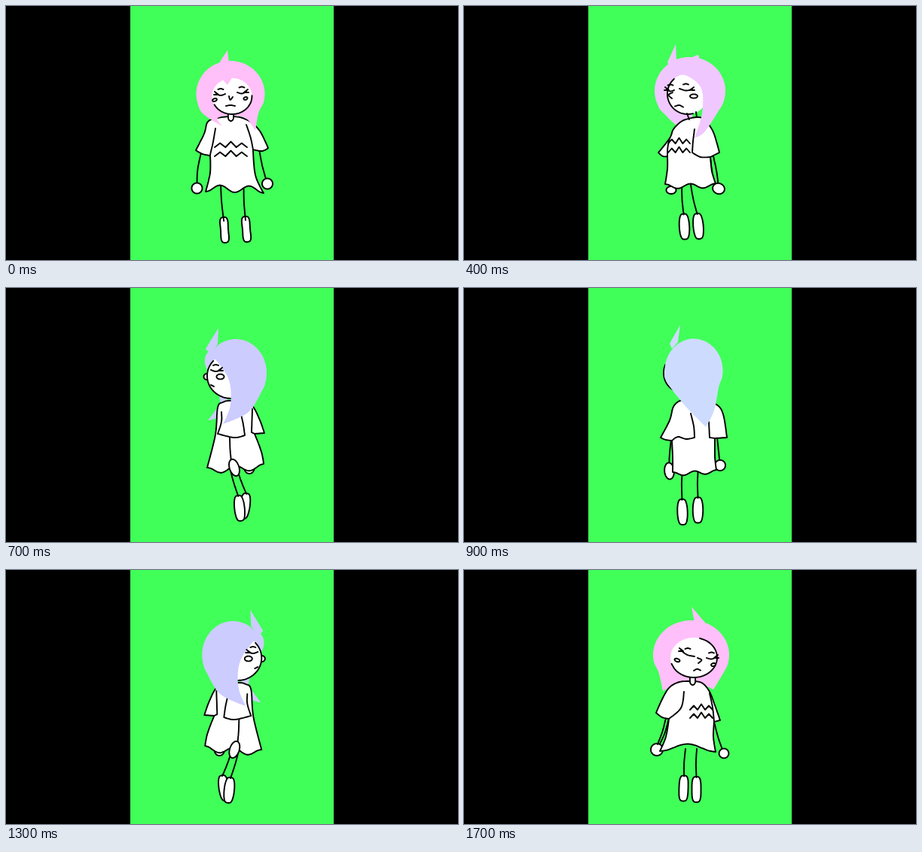
Animation of 600 by 338 pixels, one loop 1800 ms. Source, as an HTML page:

```html
<!DOCTYPE html>
<html lang="en">
<head>
<meta charset="utf-8">
<title>Turnaround</title>
<style>
html, body { margin: 0; width: 100%; height: 100%; overflow: hidden; background: #000; }
svg { display: block; width: 100vw; height: 100vh; }
path { stroke: #000; stroke-width: 1.9; stroke-linecap: round; stroke-linejoin: round; fill: none; }
.white { fill: #fff; }
.plain { fill: #fff; stroke: none; }
.hair { stroke: none; }
</style>
</head>
<body>
<svg viewBox="0 0 600 338">
  <rect width="600" height="338" fill="#000"/>
  <rect x="165" width="270" height="338" fill="#40ff59"/>
  <g id="girl"></g>
</svg>
<script>
const mix = (a, b, t) => a + (b - a) * t;
const rad = deg => deg * Math.PI / 180;
const range = (n, fn) => Array.from({ length: n }, (_, i) => fn(i));

// "x,y x,y!" to points; "!" marks a sharp corner.
const points = text => text.split(" ").map(s => {
  const [x, y] = s.replace("!", "").split(",").map(Number);
  return { x, y, hard: s.endsWith("!") };
});

// Smooth line through the points, sharp at hard ones.
function curve(p, closed) {
  const n = p.length, out = [];
  const at = i => closed ? p[(i + n) % n] : p[Math.max(0, Math.min(n - 1, i))];
  for (let i = 0; i < (closed ? n : n - 1); i++) {
    const a = at(i), b = at(i + 1), prev = at(i - 1), next = at(i + 2);
    const axis = (k, t) => {
      const c = a.hard ? a[k] : a[k] + (b[k] - prev[k]) / 6;
      const d = b.hard ? b[k] : b[k] - (next[k] - a[k]) / 6;
      const s = 1 - t;
      return s * s * s * a[k] + 3 * s * s * t * c + 3 * s * t * t * d + t * t * t * b[k];
    };
    for (let j = 0; j < 8; j++) out.push({ x: axis("x", j / 8), y: axis("y", j / 8) });
  }
  if (!closed) out.push(at(n - 1));
  return out;
}

const shape = (name, kind, pts) => ({ name, kind, closed: true, pts: curve(pts, true) });
const line = (name, pts) => ({ name, kind: "line", closed: false, pts: curve(pts, false) });
const arc = (cx, cy, rx, ry, from, to, n = 12) => range(n + 1, i => {
  const a = rad(mix(from, to, i / n));
  return { x: cx + rx * Math.cos(a), y: cy + ry * Math.sin(a) };
});

// Line bent sideways in its middle.
function bow(name, x0, y0, x1, y1, sag = 0) {
  const dx = x1 - x0, dy = y1 - y0, len = Math.hypot(dx, dy);
  const mid = { x: (x0 + x1 - 2 * dy / len * sag) / 2, y: (y0 + y1 + 2 * dx / len * sag) / 2 };
  return line(name, [{ x: x0, y: y0 }, mid, { x: x1, y: y1 }]);
}

// Oval; a squarer power and a pinched waist turn it into a foot.
function oval(name, cx, cy, rx, ry = rx, tilt = 0, power = 1, pinch = 0) {
  const a = rad(tilt);
  return shape(name, "white", range(24, i => {
    const u = i * Math.PI / 12, c = Math.cos(u);
    const p = rx * Math.sign(c) * Math.abs(c) ** power * (1 - pinch * c ** 4), q = ry * Math.sin(u);
    return { x: cx + p * Math.cos(a) - q * Math.sin(a), y: cy + p * Math.sin(a) + q * Math.cos(a) };
  }));
}

const FOOT = 17;
function leg(side, hip, x, y, tilt = 0, pinch = 0, inset = 1) {
  const top = FOOT - inset;
  return [
    oval("foot" + side, x, y, 6.7, FOOT, tilt, 0.6, pinch),
    bow("leg" + side, hip, 238, x + top * Math.sin(rad(tilt)), y - top * Math.cos(rad(tilt)), 0.8)
  ];
}

const arm = (side, x, y, hx, hy, sag, rx = 7, ry = rx, tilt = 0) =>
  [bow("arm" + side, x, y, hx, hy, sag), oval("hand" + side, hx, hy, rx, ry, tilt)];

// Both sides run downward from the neck; the hem waves between their ends.
function dress(left, right, wave, bumps = 2) {
  const l = points(left), r = points(right).reverse(), a = l[l.length - 1], b = r[0];
  const hem = range(7 * bumps, i => {
    const t = (i + 1) / (7 * bumps + 1);
    return { x: mix(a.x, b.x, t), y: mix(a.y, b.y, t) - wave * (1 - Math.cos(2 * Math.PI * bumps * t)) / 2 };
  });
  return shape("dress", "white", [...l, ...hem, ...r]);
}

const zigzags = (x, y, w, gap) => [0, 1].map(row => ({
  name: "zigzag" + row, kind: "line", closed: false,
  pts: range(7, i => ({ x: x + w * i / 6, y: y + row * gap - (i % 2) * 5.5 - (i === 3 ? 2 : 0) }))
}));

const hair = (name, cx, cy, rx, ry, from, to, rest) =>
  shape(name, "hair", [...arc(cx, cy, rx, ry, from, to), ...points(rest)]);
const tuft = text => shape("tuft", "hair", points(text));
const neck = (x, y) =>
  shape("neck", "white", points(`${x - 3.5},${y}! ${x - 3.3},${y + 9} ${x},${y + 12} ${x + 3.3},${y + 9} ${x + 3.5},${y}!`));
const face = (cx, cy, rx, ry, from, to) => [
  shape("face", "plain", arc(cx, cy, rx, ry, 0, 345, 23)),
  line("jaw", arc(cx, cy, rx, ry, from, to))
];

// Lid with two lashes at the outer end and a brow above.
function eye(side, x0, y0, x1, y1) {
  const out = side === "L" ? -1 : 1, [x, y] = out < 0 ? [x0, y0] : [x1, y1];
  const mx = (x0 + x1) / 2, my = (y0 + y1) / 2 - 6;
  return [
    bow("lid" + side, x0, y0, x1, y1, 2),
    bow("lash" + side, x - out * 3, y + 1, x + out * 2, y - 3, 0),
    bow("tip" + side, x - out, y + 1, x + out * 3, y + 1, 0),
    bow("brow" + side, mx - 3.5, my, mx + 3.5, my, -1)
  ];
}

function flip({ rgb, parts }) {
  const swap = { L: "R", R: "L" };
  return {
    rgb,
    parts: parts.map(p => ({
      ...p,
      name: p.name.replace(/[LR]$/, s => swap[s]),
      pts: p.pts.map(({ x, y }) => ({ x: 606.3 - x, y }))
    }))
  };
}

const pose = (rgb, ...items) => ({ rgb, parts: items.flat(2) });

// Shared by the views from straight ahead and straight behind.
const standing = (hem, wave, tip) => [
  leg("L", 285, 290, 298, -4, 0.25, 5), leg("R", 315.5, 319, 297, -5, 0.25, 5),
  arm("L", 259, 195, 253.5, 242.5, 2), arm("R", 336, 191, 347, 236.5, 1),
  dress(`296,147 281,149 268,154 263,170 252,192! 261,197 271,199! 271,222 ${hem - 240 + 258},${hem}!`,
    `302,147 314,149 327,156 338,168 348,${tip}! 340,193 328,191! 331,225 342,${hem + 2}!`, wave)
];

const front = pose([255, 191, 248],
  standing(247, 9, 189),
  bow("sleeveL", 278, 163, 271, 198, -0.5), bow("sleeveR", 319, 158, 328, 191, -1),
  zigzags(277, 188, 43, 12),
  tuft("294,59! 284,74! 289,80! 296,76!"),
  hair("back", 298, 117, 45.5, 44, 142, 395, "331,166! 319,150 300,146 281,149 287,160!"),
  neck(298.5, 141),
  face(300, 120, 26.5, 24, -2, 152),
  shape("fringe", "hair", points("284,94! 294,105! 301,94!")),
  eye("L", 279, 117, 291, 117), eye("R", 307, 115, 319, 114),
  oval("cheekL", 277, 125, 3, 1.8, -20), oval("cheekR", 318, 123, 2.6, 1.8, -20),
  bow("nose", 296, 120, 301, 121, 4.5), bow("mouth", 292, 133, 304, 133, -1));

const slant = pose([255, 191, 250],
  tuft("302,49! 306,70! 314,78! 320,70!"),
  hair("back", 301.5, 113, 50.5, 46, 148, 395, "331,159! 300,148 264,161!"),
  leg("L", 294, 291.5, 290.5, 2, 0.1), leg("R", 309, 308.5, 292, 0, 0.1),
  arm("L", 272, 197, 256, 239, -2, 8), arm("R", 332, 202, 345, 244, 1, 6.4),
  bow("side", 268, 197, 257, 232, -1),
  dress("300,148 286,149 273,156 264,170 255,190! 263,196 272,198! 268,222 260,241!",
    "307,148 317,151 326,162 333,180 340,200! 332,202! 331,222 334,242!", 10, 1),
  bow("sleeveL", 292, 162, 272, 198, -7), bow("sleeveR", 326, 164, 332, 202, -1),
  zigzags(300, 186, 30, 11),
  neck(303.5, 141),
  face(305, 116.5, 31, 26.5, -75, 162),
  eye("L", 288, 107, 306, 115), eye("R", 322, 117, 335, 116),
  oval("cheekL", 283, 120, 3.6, 2, 20), oval("cheekR", 331, 126, 3, 2, -15),
  bow("nose", 310, 117, 311, 124, -5), bow("mouth", 305, 134, 314, 133.5, -2));

const side = pose([240, 199, 255],
  hair("back", 300, 113, 47, 45, 142, 285, "300,120 303,150 290,164"),
  leg("L", 289, 292.5, 293.5, -3), leg("R", 301, 311, 293, -5),
  oval("handL", 275, 245, 6.5, 5),
  bow("side", 327, 199, 333, 238, 1),
  dress("298,150 288,154 278,164 273,176 258,195! 264,200 270,200! 270,217 267,237!",
    "311,148 320,152 331,168 339,195! 327,201! 329,220 334,236!", -6),
  arm("R", 331, 200, 338, 243, -1, 8, 7, 20),
  bow("sleeveL", 273, 176, 270, 200, 1),
  line("sleeveR", points("306,164 304,180 303,195! 314,201 327,201")),
  zigzags(271, 183, 29, 12),
  face(297, 117, 27, 27, 75, 228),
  bow("throatL", 296, 143, 299, 151, 0), bow("throatR", 308, 141, 309, 148, 0),
  hair("hair", 300, 113, 47, 45, 240, 395, "319,168 306,175! 316,143 315,110 296,93 277,92!"),
  tuft("281,51! 270,75! 276,85! 282,73!"),
  eye("L", 269, 111, 279, 112), eye("R", 286, 110, 303, 111),
  oval("cheekR", 305, 120, 5, 2.6),
  bow("nose", 277, 115, 276, 123, 5), bow("mouth", 280, 133.5, 291, 134.5, -2));

const away = pose([204, 204, 255],
  shape("back", "hair", points("274,84 264,100 283,145 281,158 268,176! 290,164 297,110")),
  leg("R", 306, 317, 290, 8), leg("L", 297, 310, 293, -6),
  oval("handR", 323, 240, 6.5, 7),
  dress("298,150 288,152 281,159 278,195 267,239!",
    "318,152 328,158 337,176 343,193! 330,194! 339,218 342,234!", -8),
  line("sleeveR", points("327,161 326,192! 330,194")),
  line("sleeveL", points("286,165 286,178 281,194! 303,199 317,196! 315,182 312,168")),
  bow("fold", 297, 199, 299, 231, 0.5),
  oval("handL", 303, 239, 6.3, 11.5, -18),
  oval("bump", 266.5, 118, 4),
  face(299, 117, 32, 30, 90, 222),
  hair("hair", 305, 113, 41, 45, 235, 390, "322,165 288,181! 298,155 295,120 272,88!"),
  tuft("282,53! 265,81! 273,90! 281,74!"),
  eye("R", 272, 109, 285, 109),
  oval("cheekR", 284.5, 118, 5, 3.4),
  bow("mouth", 272, 129, 276, 131));

const veil = (cx, rx, from, tip, end) => hair("hair", cx, 110, rx, 42.5, from, 390, `332,163 ${tip},185! ${end}`);

const rear = pose([205, 219, 255],
  leg("L", 290, 290, 298, -2), leg("R", 311, 310.5, 295.5, 0),
  arm("L", 275, 202, 272.5, 243.5, 1, 6.3, 11, -5), arm("R", 336, 199, 340, 236, 0),
  face(290, 113, 25, 26, 115, 205),
  dress("299,150 287,150 278,158 273,176 261,199! 268,202 276,203! 277,225 277,245!",
    "316,150 335,155 344,168 349,199! 333,200! 333,225 335,242!", -5),
  line("sleeveL", points("276,203 284,198 295,201 306,199! 305,184 301,167")),
  line("sleeveR", points("325,178 326,199! 333,200")),
  veil(305, 38.5, 160, 321, "292,155"),
  tuft("287,49! 273,74! 276,81! 284,72!"));

const back = pose([168, 220, 255],
  standing(242, -7, 181),
  bow("sleeveL", 284, 178, 271, 199, -6), bow("sleeveR", 319, 180, 328, 191, 5),
  veil(297, 48.5, 145, 322, "282,163"),
  tuft("291,48! 279,69! 285,77! 293,74!"));

const COUNT = 80;

// Evenly spaced points along a part, closed ones all in the same direction.
function even({ pts, closed }) {
  let p = closed ? [...pts, pts[0]] : pts;
  if (closed) {
    let area = 0;
    for (let i = 1; i < p.length; i++) area += p[i - 1].x * p[i].y - p[i].x * p[i - 1].y;
    if (area < 0) p = [...p].reverse();
  }
  const dist = [0];
  for (let i = 1; i < p.length; i++)
    dist.push(dist[i - 1] + Math.hypot(p[i].x - p[i - 1].x, p[i].y - p[i - 1].y));
  const step = dist[dist.length - 1] / (closed ? COUNT : COUNT - 1);
  let k = 1;
  return range(COUNT, i => {
    while (k < p.length - 1 && dist[k] < step * i) k++;
    const t = (step * i - dist[k - 1]) / (dist[k] - dist[k - 1] || 1);
    return { x: mix(p[k - 1].x, p[k].x, t), y: mix(p[k - 1].y, p[k].y, t) };
  });
}

function morph(a, b, t) {
  const p = even(a), q = even(b);
  const options = a.closed
    ? q.map((_, k) => [...q.slice(k), ...q.slice(0, k)])
    : [q, [...q].reverse()];
  const cost = r => r.reduce((s, v, i) => s + (v.x - p[i].x) ** 2 + (v.y - p[i].y) ** 2, 0);
  const best = options.reduce((m, r) => cost(r) < cost(m) ? r : m);
  return p.map((v, i) => ({ x: mix(v.x, best[i].x, t), y: mix(v.y, best[i].y, t) }));
}

// Parts and their order come from the nearer pose.
function between(a, b, t) {
  const near = t < 0.5 ? a : b, far = t < 0.5 ? b : a, w = t < 0.5 ? t : 1 - t;
  const parts = near.parts.map(p => {
    const other = far.parts.find(o => o.name === p.name);
    return other ? { ...p, pts: morph(p, other, w) } : p;
  });
  return { rgb: a.rgb.map((v, i) => Math.round(mix(v, b.rgb[i], t))), parts };
}

function markup({ rgb, parts }) {
  return parts.map(({ kind, closed, pts }) => {
    const d = "M" + pts.map(p => p.x.toFixed(1) + " " + p.y.toFixed(1)).join("L") + (closed ? "Z" : "");
    return `<path class="${kind}"${kind === "hair" ? ` fill="rgb(${rgb})" style="fill:rgb(${rgb})"` : ""} d="${d}"/>`;
  }).join("");
}

const STEP = 100, STEPS = 18;
const keys = [
  [0, front], [3, flip(slant)], [4, side], [7, away], [9, rear], [11, back],
  [13, flip(away)], [16, flip(side)], [17, slant], [18, front]
];
const drawings = range(STEPS, i => {
  const k = keys.findIndex(([n]) => n > i) - 1;
  const [n0, a] = keys[k], [n1, b] = keys[k + 1];
  return markup(i === n0 ? a : between(a, b, (i - n0) / (n1 - n0)));
});

const girl = document.getElementById("girl");
let shown = -1;
function draw(ms) {
  const i = Math.floor(ms / STEP) % STEPS;
  if (i !== shown) girl.innerHTML = drawings[shown = i];
}

draw(0);
let start = null;
requestAnimationFrame(function tick(now) {
  if (start === null) start = now;
  draw(now - start);
  requestAnimationFrame(tick);
});
</script>
</body>
</html>
```
